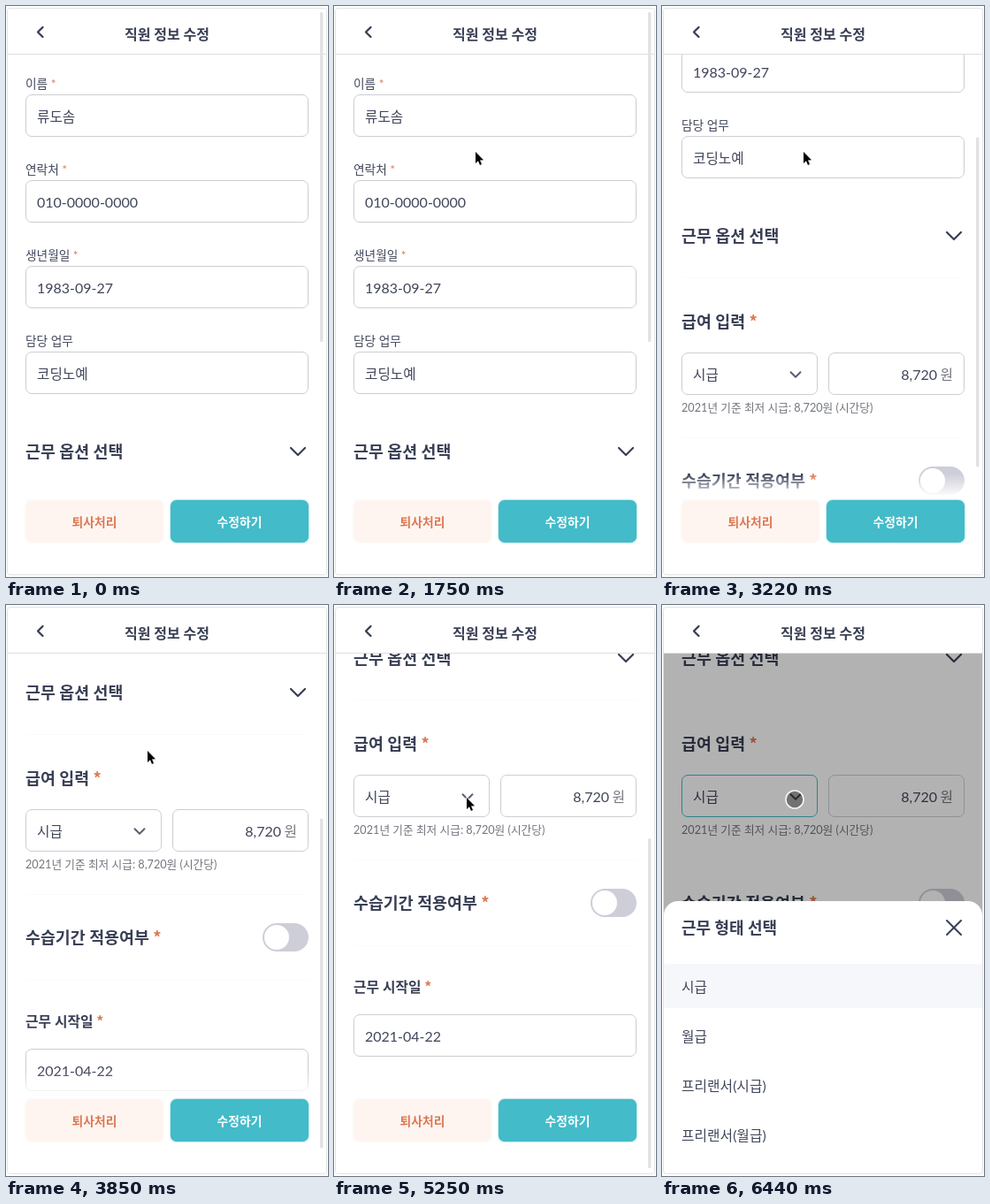
Recreate the animation shown at these times as an HTML page with a canvas. Size 364x646 px, loop 7.35 s.

```html
<!DOCTYPE html>
<html lang="ko">
<head>
<meta charset="utf-8">
<style>
  html, body { margin: 0; width: 100%; height: 100%; overflow: hidden; background: #fff; }
  canvas { display: block; }
</style>
</head>
<body>
<canvas id="stage" width="364" height="646"></canvas>
<script>
const ctx = document.getElementById('stage').getContext('2d');
const LOOP = 7350, STEP = 70;
const CJK = '"Noto Sans CJK KR", "Noto Sans CJK", sans-serif';
const FAMILY = 'Lato, ' + CJK;
const INK = '#383e54', BODY = '#40465a', MUTED = '#73767f';
const ORANGE = '#dd7852', TEAL = '#43bbc9', LINE = '#cdced3';
const LEFT = 22, RIGHT = 342, WIDTH = RIGHT - LEFT;
const HEADING = 18.4, LABEL = 13.7;

const FIELDS = [
  { label: '이름', value: '류도솜', required: true },
  { label: '연락처', value: '010-0000-0000', required: true },
  { label: '생년월일', value: '1983-09-27', required: true },
  { label: '담당 업무', value: '코딩노예' }
];
const PAY_TYPES = ['시급', '월급', '프리랜서(시급)', '프리랜서(월급)'];

const progress = (t, from, to) => Math.min(1, Math.max(0, (t - from) / (to - from)));
const smooth = u => u * u * (3 - 2 * u);
const easeOut = u => 1 - (1 - u) ** 1.5;

// Three swipes carry the form to its end.
function scrollAt(t) {
  return 88 * smooth(progress(t, 1750, 2520))
    + 160 * smooth(progress(t, 2520, 3290))
    + 196 * smooth(progress(t, 3500, 3990));
}

// The pointer rises from below, rests, then settles on the select box.
function pointerAt(t) {
  const rise = easeOut(progress(t, 490, 1470));
  const settle = smooth(progress(t, 4060, 4410));
  const drift = progress(t, 4830, 5460);
  return {
    x: 208 - 48 * rise - 10 * settle,
    y: 646 - 481 * rise + 49 * settle + 6 * drift
  };
}

// Text is placed by its vertical centre; returns the advance width.
function text(str, x, y, size, color = BODY, weight = 400, align = 'left', family = FAMILY) {
  ctx.font = `${weight} ${size}px ${family}`;
  ctx.textAlign = align;
  ctx.fillStyle = color;
  ctx.fillText(str, x, Math.round(y + size * 0.37));
  return ctx.measureText(str).width;
}

function label(str, y, size, weight, color, required) {
  const w = text(str + ' ', LEFT, y, size, color, weight);
  if (required) text('*', LEFT + w, y, size, ORANGE, weight, 'left', weight > 400 ? CJK : FAMILY);
}

function heading(str, y, required, size = HEADING) {
  label(str, y, size, 700, INK, required);
}

function rounded(x, y, w, h, r, fill, stroke) {
  ctx.beginPath();
  ctx.roundRect(x, y, w, h, r);
  if (fill) { ctx.fillStyle = fill; ctx.fill(); }
  if (stroke) { ctx.strokeStyle = stroke; ctx.lineWidth = 1; ctx.stroke(); }
}

function disc(x, y, r, fill, stroke) {
  ctx.beginPath();
  ctx.arc(x, y, r, 0, Math.PI * 2);
  ctx.fillStyle = fill;
  ctx.fill();
  if (stroke) { ctx.strokeStyle = stroke; ctx.lineWidth = 1.6; ctx.stroke(); }
}

function polyline(points, width, color = INK) {
  ctx.beginPath();
  points.forEach(([x, y]) => ctx.lineTo(x, y));
  ctx.strokeStyle = color;
  ctx.lineWidth = width;
  ctx.lineCap = ctx.lineJoin = 'round';
  ctx.stroke();
}

function chevronDown(x, y, r, width, color) {
  polyline([[x - r, y - r / 2], [x, y + r / 2], [x + r, y - r / 2]], width, color);
}

function box(x, y, w, stroke = LINE) {
  rounded(x + 0.5, y + 0.5, w - 1, 47, 6.5, '#fff', stroke);
}

function field(y, value) {
  box(LEFT, y, WIDTH);
  text(value, 35, y + 25, /\d/.test(value) ? 16 : 15.7);
}

function rule(y) {
  ctx.fillStyle = '#fbfbfc';
  ctx.fillRect(LEFT, y, WIDTH, 1);
}

function button(x, caption, fill, color) {
  ctx.shadowColor = fill;
  ctx.shadowBlur = 2;
  rounded(x, 559, 156, 48, 7, fill);
  ctx.shadowBlur = 0;
  text(caption, x + 78, 583.5, 13.8, color, 700, 'center');
}

function clipToContent() {
  ctx.beginPath();
  ctx.rect(2, 55, 360, 588);
  ctx.clip();
}

function drawForm(scroll, focused) {
  ctx.save();
  clipToContent();
  ctx.translate(0, -Math.round(scroll));

  FIELDS.forEach((f, i) => {
    const y = 88 + 97 * i;
    label(f.label, y, LABEL, 400, BODY, f.required);
    field(y + 12, f.value);
  });

  heading('근무 옵션 선택', 504);
  chevronDown(330, 504, 8, 2.2);
  rule(551);

  heading('급여 입력', 601, true);
  box(LEFT, 636, 154, focused ? TEAL : LINE);
  text('시급', 35, 661, 15.7);
  chevronDown(151, 661, 5.5, 2, '#5b6072');
  box(188, 636, 154);
  text('8,720', 311, 661, 16, BODY, 400, 'right');
  text('원', 329, 661, 15.7, MUTED, 400, 'right');
  text('2021년 기준 최저 시급: 8,720원 (시간당)', LEFT, 698, 12.7, MUTED);
  rule(732);

  heading('수습기간 적용여부', 781, true);
  rounded(290, 765, 52, 32, 16, '#cdced8');
  disc(306, 781, 14, '#fff');
  rule(829);

  heading('근무 시작일', 876, true, 15.8);
  field(907, '2021-04-22');
  ctx.restore();
}

function drawFooter() {
  const fade = ctx.createLinearGradient(0, 529, 0, 556);
  fade.addColorStop(0, 'rgba(255,255,255,0)');
  fade.addColorStop(1, '#fff');
  ctx.fillStyle = fade;
  ctx.fillRect(2, 529, 352, 114);
  button(22, '퇴사처리', '#fef5f1', ORANGE);
  button(186, '수정하기', TEAL, '#fff');
}

function drawHeader() {
  ctx.fillStyle = '#fff';
  ctx.fillRect(0, 0, 364, 54);
  ctx.fillStyle = '#dfdfe3';
  ctx.fillRect(2, 54, 360, 1);
  polyline([[41.5, 24], [36, 29.5], [41.5, 35]], 2.3);
  text('직원 정보 수정', 182, 32, 16, INK, 700, 'center');
}

function drawSheet(open) {
  ctx.save();
  clipToContent();
  ctx.fillStyle = `rgba(0,0,0,${0.3 * open})`;
  ctx.fillRect(2, 55, 360, 588);
  ctx.translate(0, 308 * (1 - open));
  rounded(2, 335, 360, 320, 16, '#fff');
  heading('근무 형태 선택', 365, false, 18);
  for (const d of [-8, 8]) polyline([[330 - d, 357], [330 + d, 373]], 2);
  ctx.fillStyle = '#f6f7fa';
  ctx.fillRect(2, 406, 360, 50);
  PAY_TYPES.forEach((name, i) => text(name, LEFT, 432 + 56 * i, 15.8));
  ctx.restore();
}

function drawArrow(x, y) {
  ctx.beginPath();
  [[0, 0], [0, 13], [3, 10.3], [5, 15], [7, 14], [5, 9.5], [9, 9.3]]
    .forEach(([dx, dy]) => ctx.lineTo(x + dx, y + dy));
  ctx.closePath();
  ctx.strokeStyle = '#fff';
  ctx.lineWidth = 1.6;
  ctx.stroke();
  ctx.fillStyle = '#000';
  ctx.fill();
}

function draw(t) {
  const scroll = scrollAt(t);
  const open = progress(t, 6090, 6230);
  const pointer = pointerAt(t);

  ctx.fillStyle = '#fff';
  ctx.fillRect(0, 0, 364, 646);
  drawForm(scroll, t >= 5740);
  drawFooter();
  drawHeader();
  if (open > 0) drawSheet(open);
  else rounded(355, 7 + scroll * 0.579, 3.5, 373, 1.5, '#e2e2e4');
  rounded(1.5, 2.5, 361, 641, 3, null, '#e3e3e5');

  if (t >= 5600) disc(pointer.x, pointer.y, 10, 'rgba(0,0,0,.36)', 'rgba(255,255,255,.9)');
  else if (t >= 560) drawArrow(pointer.x, pointer.y);
}

const start = performance.now();
function tick() {
  const t = (performance.now() - start) % LOOP;
  draw(Math.floor(t / STEP) * STEP);
  requestAnimationFrame(tick);
}
tick();
</script>
</body>
</html>
```
